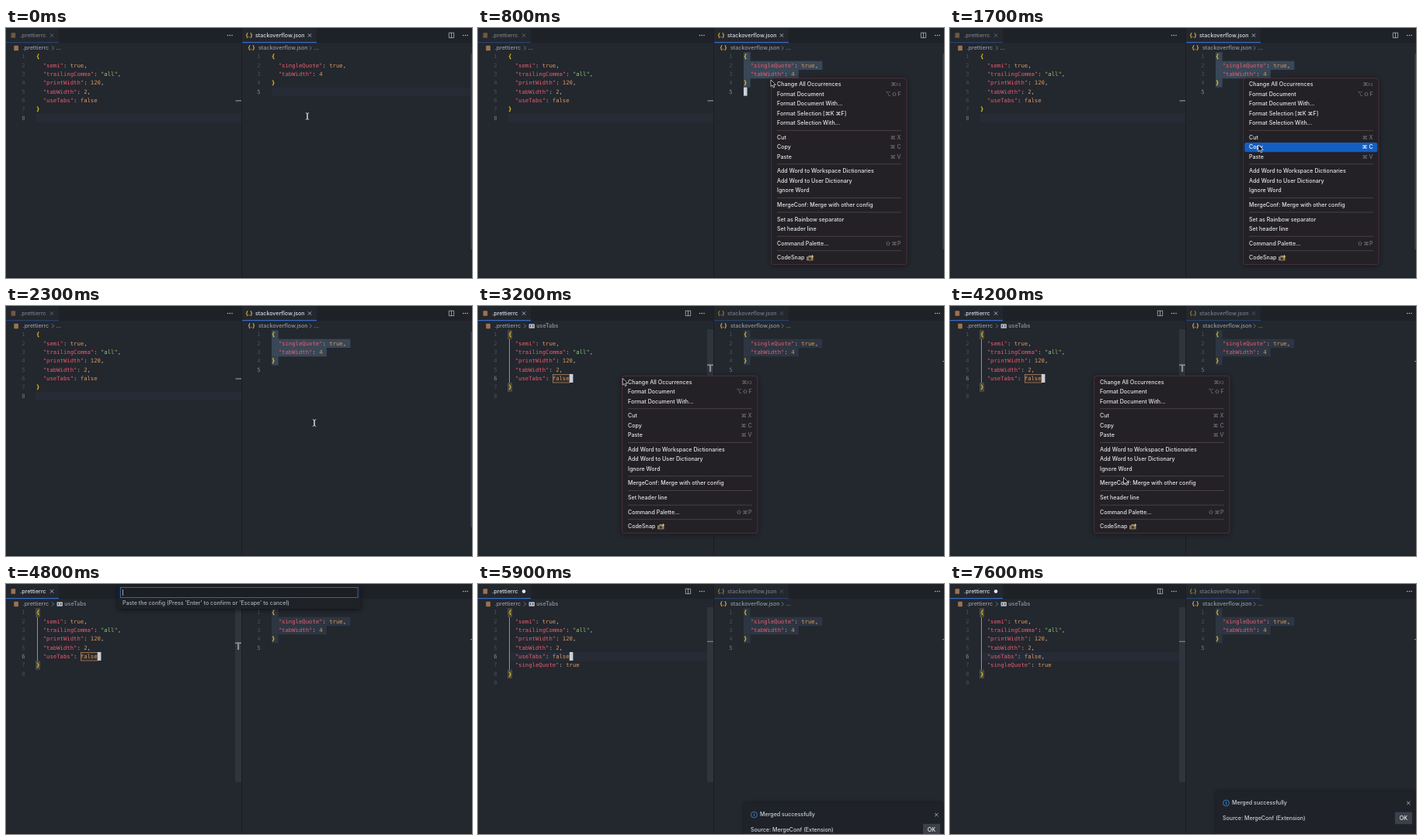
An HTML page for the animation above (7.7 s loop, 600 px wide and 323 px high).

```html
<!DOCTYPE html>
<html lang="en">
<head>
<meta charset="utf-8">
<title>Merging editor settings</title>
<style>
  html, body { margin: 0; width: 100%; height: 100%; overflow: hidden; background: #23272e; }
  svg { display: block; width: 600px; height: 323px; }
  text { font: 500 7.1px Inter, "DejaVu Sans", sans-serif; white-space: pre; }
  .code { font: 7.25px "DejaVu Sans Mono", monospace; }
  .small { font-size: 5px; }
  .bold { font-weight: 700; }
</style>
</head>
<body>
<svg id="stage" viewBox="0 0 600 323"></svg>
<script>
const LOOP = 7700, STEP = 100;
const SELECT = 300, MENU_A = 600, COPY = 2000, FOCUS = 2900, PICK = 4600, PASTE = 5000, MERGE = 5700, TOAST = 5800;
const LINE = 11.33, CHAR = 4.365;
const C = {
  bg: '#23272e', bar: '#1e2227', edge: '#1b1e23', text: '#d9dce2', dim: '#777c87', crumb: '#9298a4',
  gold: '#ffd21a', key: '#ea5c6e', string: '#89ca78', value: '#d8985f', punct: '#bbc0ca',
  number: '#495060', active: '#858b97', idle: '#737985', current: '#272b36', caret: '#cdd0d6',
  guide: '#b8951c', blue: '#145ec2'
};
const stage = document.getElementById('stage');
const timed = [];
let target = stage;

function add(tag, attrs, parent = target) {
  const node = document.createElementNS('http://www.w3.org/2000/svg', tag);
  for (const name in attrs) node.setAttribute(name, attrs[name]);
  return parent.appendChild(node);
}
const rect = (x, y, width, height, fill, more) => add('rect', { x, y, width, height, fill, ...more });
const path = (d, stroke, more) => add('path', { d, stroke, fill: 'none', 'stroke-width': 0.7, ...more });
const dot = (cx, cy, r, fill) => add('circle', { cx, cy, r, fill });

// y is the vertical middle of the text
function label(x, y, string, fill = C.text, more) {
  const node = add('text', { x, y: y + 2.3, fill, ...more });
  node.textContent = string;
  return node;
}

// Draws into a group that is visible only during the given [from, to) spans
function group(spans, draw) {
  const outer = target;
  const node = target = add('g', {});
  timed.push({ node, spans });
  draw();
  target = outer;
  return node;
}

const lineY = n => 37 + (n - 1) * LINE;
const cross = (x, y, color) => path(`M${x - 2.2} ${y - 2.2}l4.4 4.4m0-4.4l-4.4 4.4`, color);
const chevron = x => path(`M${x - 1.2} 23.3l2.5 2.6l-2.5 2.6`, C.crumb);
const dots = x => [-2.7, 0, 2.7].forEach(d => dot(x + d, 9.5, 0.75, '#c5c9d1'));
const splitIcon = x => path(`M${x - 3.2} 6.2h6.4v6.4h-6.4zM${x} 6.2v6.4`, '#c5c9d1');
const braces = (x, y, opacity) => label(x, y - 0.3, '{.}', '#efba2c', { opacity, class: 'bold' });
const fileBlock = (x, y, opacity) => rect(x, y - 3.2, 5.6, 6.4, '#9a7350', { opacity, rx: 0.6 });

function codeLine(x, n, source) {
  const node = label(x, lineY(n), '', C.punct, { class: 'code' });
  for (const token of source.match(/"\w+"(?=:)|"\w+"|\w+|[{}]|[^\w"{}]+/g) || []) {
    const brace = /[{}]/.test(token);
    const fill = /^"/.test(token) ? (source.includes(token + ':') ? C.key : C.string)
      : /^\w/.test(token) ? C.value : brace ? C.gold : C.punct;
    add('tspan', { fill, class: brace ? 'bold' : '' }, node).textContent = token;
  }
}
const code = (x, lines) => lines.forEach((source, i) => codeLine(x, i + 1, source));

function numbers(right, count, active, color) {
  for (let n = 1; n <= count; n++) {
    label(right, lineY(n), n, n === active ? color : C.number, { class: 'code', 'text-anchor': 'end' });
  }
}

function tab(x, width, name, nameX, focused, icon) {
  rect(x, 0, width, 19, C.bg);
  rect(x, 18.2, width, 1, focused ? '#3f7be6' : '#2a4677');
  icon(focused ? 1 : 0.65);
  label(nameX, 9.5, name, focused ? C.text : C.dim);
}

const band = (x, n, width, fill) => rect(x, lineY(n) - LINE / 2, width, LINE, fill);
const caret = (x, n) => rect(x, lineY(n) - 5.7, 4.6, 11, C.caret);

function selection(fill) {
  [2, 23, 16, 2].forEach((chars, i) => band(342, i + 1, chars * CHAR + (i % 3 ? 1 : 0), fill));
}

function bracketBox(n) {
  rect(38.7, lineY(n) - 5.2, CHAR + 0.6, 10.4, '#3f4143', { stroke: '#66665e', 'stroke-width': 0.5 });
}

// Matching braces on line 1 and the given line, joined by a guide
function bracketPair(last) {
  bracketBox(1);
  bracketBox(last);
  rect(40, 43, 1, lineY(last) - 48.5, C.guide);
}

/* Editor frames, tabs and breadcrumbs */
rect(0, 0, 600, 323, C.bg);
rect(0, 0, 600, 19, C.bar);
const rightActive = [[0, FOCUS]], leftActive = [[FOCUS, LOOP]];

for (const [spans, left] of [[rightActive, false], [leftActive, true]]) {
  group(spans, () => {
    tab(0, 68, '.prettierrc', 18, left, o => fileBlock(6.6, 9.5, o));
    tab(304, 96, 'stackoverflow.json', 321, !left, o => braces(308.5, 9.5, o));
    splitIcon(left ? 270.5 : 573.5);
    cross(391, 9.5, left ? '#5f646f' : C.text);
  });
}
group(rightActive, () => cross(59, 9.5, C.dim));
group([[FOCUS, MERGE]], () => cross(59, 9.5, C.text));
group([[MERGE, LOOP]], () => dot(59, 9.6, 2.3, '#e4e6ea'));
dots(288.3);
dots(591.5);

fileBlock(10.3, 26, 1);
label(21.5, 26, '.prettierrc', C.crumb);
chevron(60.3);
group(rightActive, () => label(64.5, 26, '...', C.crumb));
group(leftActive, () => {
  rect(65.5, 23.3, 7.4, 5.4, '#b9bec8', { rx: 0.6 });
  path('M67.6 24.6v2.6M70.8 24.6v2.6', C.bg, { 'stroke-width': 0.9 });
  label(75.3, 26, 'useTabs', C.crumb);
});
braces(311.5, 26, 1);
label(325, 26, 'stackoverflow.json', C.crumb);
chevron(392);
label(396.5, 26, '...', C.crumb);

/* Left editor */
const head = ['{', '  "semi": true,', '  "trailingComma": "all",', '  "printWidth": 120,', '  "tabWidth": 2,'];
group(rightActive, () => {
  band(38, 8, 265, C.current);
  rect(295.5, 93.5, 7.5, 1, '#a6a9af');
  numbers(24.5, 8, 8, C.idle);
});
group([[MERGE, LOOP]], () => band(38, 6, 265, C.current));
group(leftActive, () => rect(295, 30, 8, 226, '#30343d'));
group([[FOCUS, MERGE]], () => {
  rect(295, 75.5, 8, 1.6, '#8b8e94');
  rect(298, 75.5, 2.2, 9.5, '#8b8e94');
  numbers(24.5, 8, 6, C.active);
  bracketPair(7);
  rect(96.3, 88.6, 21.8, 10.4, '#2c2d30', { stroke: '#c08a5a', 'stroke-width': 0.7 });
});
group([[MERGE, LOOP]], () => {
  rect(295, 73.8, 8, 1, '#8b8e94');
  numbers(24.5, 9, 6, C.active);
  bracketPair(8);
});
group([[0, MERGE]], () => code(39, [...head, '  "useTabs": false', '}']));
group([[MERGE, LOOP]], () => code(39, [...head, '  "useTabs": false,', '  "singleQuote": true', '}']));
group([[FOCUS, MERGE + 500], [MERGE + 1000, MERGE + 1500]], () => caret(117.8, 6));

/* Right editor */
rect(303, 0, 1, 323, C.edge);
group([[0, SELECT]], () => band(342, 5, 256, C.current));
group(rightActive, () => rect(598.3, 33, 1.7, 253, '#3c4049'));
group(leftActive, () => rect(598, 71, 2, 1, '#8b8e94'));
group([[SELECT, FOCUS]], () => selection('#394757'));
group(leftActive, () => selection('#2d3642'));
group(rightActive, () => numbers(327.5, 5, 5, C.active));
group(leftActive, () => numbers(327.5, 5, 5, C.idle));
code(342, ['{', '  "singleQuote": true,', '  "tabWidth": 4', '}']);
group([[SELECT, 1000]], () => caret(342, 5));
rect(0, 322, 600, 1, C.bar);

/* Context menus; null is a separator */
const edit = [null, ['Cut', '⌘ X'], ['Copy', '⌘ C'], ['Paste', '⌘ V'], null,
  ['Add Word to Workspace Dictionaries'], ['Add Word to User Dictionary'], ['Ignore Word'], null,
  ['MergeConf: Merge with other config'], null];
const format = [['Change All Occurrences', '⌘F2'], ['Format Document', '⌥\u200a⇧\u200aF'],
  ['Format Document With...']];
const tail = [['Set header line'], null, ['Command Palette...', '⇧\u200a⌘\u200aP'], null, ['CodeSnap']];

function camera(x, y) {
  rect(x, y - 1.8, 8.6, 5.2, '#8b7a61', { rx: 0.8 });
  rect(x + 2.6, y - 3, 3.2, 1.6, '#a89679');
  dot(x + 4.3, y + 0.9, 1.7, '#30343a');
  path(`M${x + 7.4} ${y - 3.8}v3.6m-1.8-1.8h3.6`, '#f4cf58', { 'stroke-width': 1 });
}

function menu(x, y, from, to, items) {
  const rows = [];
  const seps = items.filter(item => !item).length;
  const height = (items.length - seps) * 12.47 + seps * 6.15 + 4.4;
  group([[from, to]], () => {
    rect(x + 0.4, y - 0.2, 174.6, height, '#232126', {
      rx: 3.5, stroke: '#593840', 'stroke-width': 0.8, style: 'filter:drop-shadow(0 1px 3px #0006)'
    });
    let top = y + 2;
    for (const item of items) {
      if (!item) {
        rect(x + 8, top + 2.6, 160, 0.7, '#5b4a51');
        top += 6.15;
        continue;
      }
      const [name, keys] = item, mid = top + 6.1;
      const glow = rect(x + 2.3, top, 171, 12.4, C.blue, { rx: 2 });
      const text = label(x + 8, mid, name);
      if (name === 'CodeSnap') camera(x + 46, mid);
      let hint = null;
      if (keys) {
        hint = label(x + 167.6, mid, '', C.dim, { 'text-anchor': 'end' });
        add('tspan', {}, hint).textContent = keys.replace('F2', '');
        if (keys.endsWith('F2')) add('tspan', { class: 'small' }, hint).textContent = 'F2';
      }
      rows.push({ top, glow, text, hint });
      top += 12.47;
    }
  });
  return { x, from, to, rows };
}

const menus = [
  menu(377, 65, MENU_A, COPY, [...format, ['Format Selection [⌘K ⌘F]'], ['Format Selection With...'],
    ...edit, ['Set as Rainbow separator'], ...tail]),
  menu(185, 90.4, FOCUS, PICK, [...format, ...edit, ...tail])
];

/* Prompt for the settings to merge */
group([[PICK, MERGE]], () => {
  rect(144, 1, 312.5, 31, C.bar, { rx: 2.5, style: 'filter:drop-shadow(0 1px 3px #0009)' });
  rect(147.5, 4.5, 305.5, 13, '#1b1e23', { stroke: '#3f7be6', 'stroke-width': 0.7 });
  label(150, 24.5, "Paste the config (Press 'Enter' to confirm or 'Escape' to cancel)", '#a9aeb8');
});
group([[PICK, PASTE]], () => rect(150, 7, 0.7, 8, C.text));
group([[PASTE, MERGE]], () => label(150, 11, '{   "singleQuote": true,   "tabWidth": 4 }'));

/* Notification */
const toast = group([[TOAST, LOOP]], () => {
  rect(343, 268, 255.5, 56, '#1f2329', { style: 'filter:drop-shadow(0 0 2.5px #0007)' });
  add('circle', { cx: 355.5, cy: 283, r: 3.9, fill: 'none', stroke: '#3c8ce6', 'stroke-width': 0.8 });
  rect(355.1, 282.3, 0.9, 2.7, '#3c8ce6');
  rect(355.1, 280.8, 0.9, 0.9, '#3c8ce6');
  label(363, 283, 'Merged successfully', '#cdd1d8');
  cross(590.3, 283, C.text);
  label(351, 302.4, 'Source: MergeConf (Extension)', '#cdd1d8');
  rect(573, 294.8, 22, 15.4, '#3b404b');
  label(583.9, 302.5, 'OK', '#f0f1f3', { 'text-anchor': 'middle' });
});

/* Pointer */
const beam = group([[0, MENU_A], [COPY, FOCUS]], () => {
  const shape = 'M-2.2 -4.3q2.2 0 2.2 1.3v6q0 1.3 -2.2 1.3M2.2 -4.3q-2.2 0 -2.2 1.3v6q0 1.3 2.2 1.3';
  path(shape, '#16181c', { 'stroke-width': 1.8 });
  path(shape, '#eceef0', { 'stroke-width': 0.9 });
});
const arrow = group([[MENU_A, COPY], [FOCUS, PICK]], () =>
  path('M0 0v8.6l2-1.8l1.4 3.2l1.5-.7l-1.4-3h2.8z', '#f2f2f2', { fill: '#08080a', 'stroke-linejoin': 'round' }));

// time, x, y
const route = [
  [0, 388, 114], [100, 388, 114], [500, 377, 67], [900, 377, 67], [1500, 397, 151], [2300, 397, 151],
  [2800, 186.3, 93.5], [3300, 186.3, 93.5], [3900, 222, 238], [4000, 222, 238], [4200, 223.5, 221.5],
  [4400, 225, 227], [LOOP, 225, 227]
];

function pointerAt(t) {
  const i = route.findIndex(([time]) => time > t);
  const [t0, x0, y0] = route[i - 1], [t1, x1, y1] = route[i];
  const p = (t - t0) / (t1 - t0), e = p * p * (3 - 2 * p);
  return [x0 + (x1 - x0) * e, y0 + (y1 - y0) * e];
}

function hover({ x, from, to, rows }, t, [px, py]) {
  const inside = t >= from && t < to && px > x + 2.3;
  for (const { top, glow, text, hint } of rows) {
    const on = inside && py >= top && py < top + 12.4;
    glow.setAttribute('opacity', on ? 1 : 0);
    text.setAttribute('fill', on ? '#fff' : '#e6e5e7');
    if (hint) hint.setAttribute('fill', on ? '#fff' : '#77727a');
  }
}

function render(t) {
  for (const { node, spans } of timed) {
    node.style.display = spans.some(([from, to]) => t >= from && t < to) ? '' : 'none';
  }
  const point = pointerAt(t);
  for (const node of [beam, arrow]) node.setAttribute('transform', `translate(${point})`);
  for (const m of menus) hover(m, t, point);
  const left = 1 - Math.min(1, Math.max(0, (t - TOAST) / 300));
  toast.setAttribute('transform', `translate(0 ${51 * left ** 3})`);
}

const start = performance.now();
function tick() {
  const t = (performance.now() - start) % LOOP;
  render(Math.floor(t / STEP) * STEP);
  requestAnimationFrame(tick);
}
tick();
</script>
</body>
</html>
```
